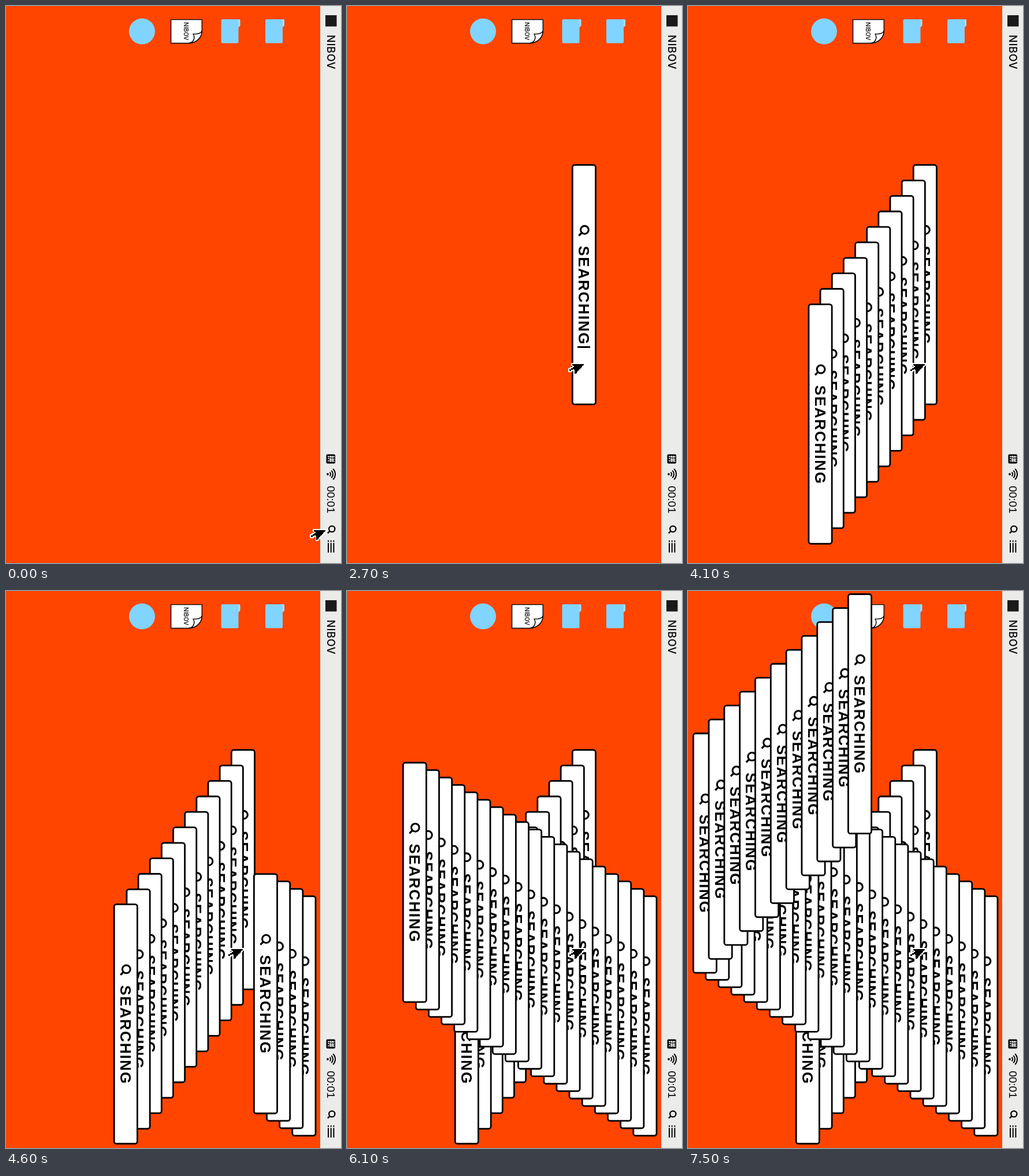
Write an HTML page that moves like this. It is 580x966 px and loops after 8 s.

```html
<!DOCTYPE html>
<html lang="en">
<head>
<meta charset="utf-8">
<title>Searching</title>
<style>
  html, body { margin: 0; width: 100%; height: 100%; overflow: hidden; background: #ff4500; }
  svg { display: block; width: 100vw; height: 100vh; }
  text { white-space: pre; font-kerning: none; }
  .word { font: bold 26px "Liberation Sans", Arial, sans-serif; letter-spacing: 1.8px; }
  .hint { font: 27px "Liberation Sans", Arial, sans-serif; fill: #9a9a9a; }
  .clock { font: 19px "Liberation Sans", Arial, sans-serif; }
  .brand { font: 500 18px Inter, "Liberation Sans", sans-serif; letter-spacing: .8px; }
  .note { font: 500 10px Inter, "Liberation Sans", sans-serif; }
  .ime { font: bold 12px "Noto Sans CJK SC", "Noto Sans CJK", sans-serif; fill: #fff; }
</style>
</head>
<body>
<svg viewBox="0 0 580 966" preserveAspectRatio="none">
  <defs>
    <g id="folder">
      <path fill="#a3e0ff" d="M3 0H31Q33 0 33 2V11L29 15V38H3Z"/>
      <rect width="30" height="41.5" rx="2.5" fill="#80d4ff"/>
    </g>
    <g id="lens" fill="none" stroke="#000">
      <circle r="6.9" stroke-width="3.1"/>
      <path d="M-4.9 4.9L-10 10" stroke-width="3.4"/>
    </g>
    <g id="panel">
      <rect x="1.4" y="1.4" width="40.2" height="415.2" rx="4" fill="#fff" stroke="#000" stroke-width="2.8"/>
      <use href="#lens" x="22.5" y="114"/>
    </g>
    <g id="window">
      <use href="#panel"/>
      <text class="word" transform="translate(12 141.8) rotate(90)">SEARCHING</text>
    </g>
  </defs>

  <rect width="580" height="966" fill="#ff4500"/>

  <!-- desktop -->
  <use href="#folder" x="449" y="23"/>
  <use href="#folder" x="372.5" y="23"/>
  <g fill="#fff" stroke="#000" stroke-width="1.4" stroke-linejoin="round">
    <path d="M285.6 23.6H339.3V43C339 54 331 63.5 317 64.5H285.6Z"/>
    <path d="M339.3 43C338 47 332 49 324 48.5C328 55 325 63 317 64.5C331 63.5 339 54 339.3 43Z"/>
  </g>
  <text class="note" transform="translate(308 43.7) rotate(90)" text-anchor="middle">NIBOV</text>
  <circle cx="235.5" cy="44" r="22.5" fill="#80d4ff"/>

  <!-- menu bar -->
  <rect x="544" width="36" height="966" fill="#ebebea"/>
  <rect x="553" y="16" width="19.5" height="19.5" fill="#1a1a1a"/>
  <text class="brand" transform="translate(556.3 50) rotate(90)">NIBOV</text>
  <rect x="554.5" y="777.5" width="15.5" height="16" rx="2" fill="#000"/>
  <text class="ime" transform="translate(558 785.5) rotate(90)" text-anchor="middle">拼</text>
  <g id="wifi" fill="none" stroke="#000" stroke-width="2">
    <circle cx="557" cy="812" r="1.9" fill="#000" stroke="none"/>
  </g>
  <text class="clock" transform="translate(556 832.2) rotate(90)">00:01</text>
  <use href="#lens" transform="translate(564.3 907) scale(.74)"/>
  <g id="list" fill="#000"></g>

  <!-- search windows -->
  <g id="first" transform="translate(388.9 274.3)">
    <use href="#panel"/>
    <text id="hint" class="hint" transform="translate(9.1 134.7) rotate(90)">Type your search</text>
    <text id="typed" class="word" transform="translate(12 141.8) rotate(90)"></text>
    <rect id="caret" width="22" height="3"/>
  </g>
  <g id="copies"></g>
  <g id="cursor" shape-rendering="crispEdges"></g>
</svg>
<script>
const LOOP = 8000, COPY_START = 3300, STEP = 100;
const WORD = 'SEARCHING';
const $ = id => document.getElementById(id);

function add(parent, tag, attrs) {
  const el = document.createElementNS('http://www.w3.org/2000/svg', tag);
  for (const k in attrs) el.setAttribute(k, attrs[k]);
  parent.appendChild(el);
  return el;
}
const show = (el, on) => el.setAttribute('visibility', on ? 'inherit' : 'hidden');
const move = (el, x, y) => el.setAttribute('transform', `translate(${x} ${y})`);

// wifi arcs opening to the right
for (const r of [5, 9, 13]) {
  const d = r * Math.SQRT1_2;
  add($('wifi'), 'path', { d: `M${557 + d} ${812 - d}A${r} ${r} 0 0 1 ${557 + d} ${812 + d}` });
}
for (const x of [557, 561.7, 566.4]) {
  add($('list'), 'rect', { x, y: 926.8, width: 2, height: 2.6 });
  add($('list'), 'rect', { x, y: 931.2, width: 2, height: 16.6 });
}

// pixel arrow as [row, offset, length] runs, turned a quarter clockwise
const runs = [];
for (let i = 0; i < 10; i++) runs.push([i, 0, i + 1]);
runs.push([10, 0, 6], [11, 0, 2], [11, 3, 2], [12, 0, 1], [12, 4, 2], [13, 4, 2], [14, 5, 2], [15, 5, 2]);
const PX = 1.6, PY = 1.75;
function drawArrow(fill, grow) {
  for (const [row, from, len] of runs) {
    add($('cursor'), 'rect', {
      x: -(row + 2 + grow) * PX, y: (from + 1 - grow) * PY,
      width: (1 + 2 * grow) * PX, height: (len + 2 * grow) * PY, fill
    });
  }
}
drawArrow('#fff', 1);
drawArrow('#000', 0);

// trails of copies: first place, step and length
const trails = [
  { x: 368.75, y: 301.15, dx: -20.15, dy: 26.85, n: 9 },
  { x: 185.8, y: 541.9, dx: 0, dy: 0, n: 1 },
  { x: 494.4, y: 528, dx: -22.15, dy: -12.87, n: 22 },
  { x: 7.8, y: 245.6, dx: 26.82, dy: -24.15, n: 11 }
];
const copies = [];
for (const { x, y, dx, dy, n } of trails) {
  for (let i = 0; i < n; i++) {
    copies.push(add($('copies'), 'use', { href: '#window', x: x + dx * i, y: y + dy * i }));
  }
}

function typedCount(t) {
  if (t < 1600) return 0;
  if (t < 1900) return 1;
  return Math.min(WORD.length, 2 + Math.floor((t - 1900) / STEP));
}

function render(t) {
  const open = t >= 400;
  move($('cursor'), open ? 412 : 555, open ? 619 : 907);
  show($('first'), open);

  // hint and caret alternate before typing starts
  const early = t < 1600;
  const hintOn = open && early && Math.floor((t - 400) / 300) % 2 === 0;
  show($('hint'), hintOn);
  $('typed').textContent = WORD.slice(0, typedCount(t));

  const lateOn = t >= 2700 && t < COPY_START && Math.floor((t - 2700) / 200) % 2 === 0;
  show($('caret'), early ? open && !hintOn : lateOn);
  $('caret').setAttribute('x', early ? 9.1 : 10.1);
  $('caret').setAttribute('y', early ? 134.7 : 315.7);

  const count = Math.floor((t - COPY_START) / STEP) + 1;
  copies.forEach((c, i) => show(c, i < count));
}

const start = performance.now();
function tick() {
  render((performance.now() - start) % LOOP);
  requestAnimationFrame(tick);
}
tick();
</script>
</body>
</html>
```
